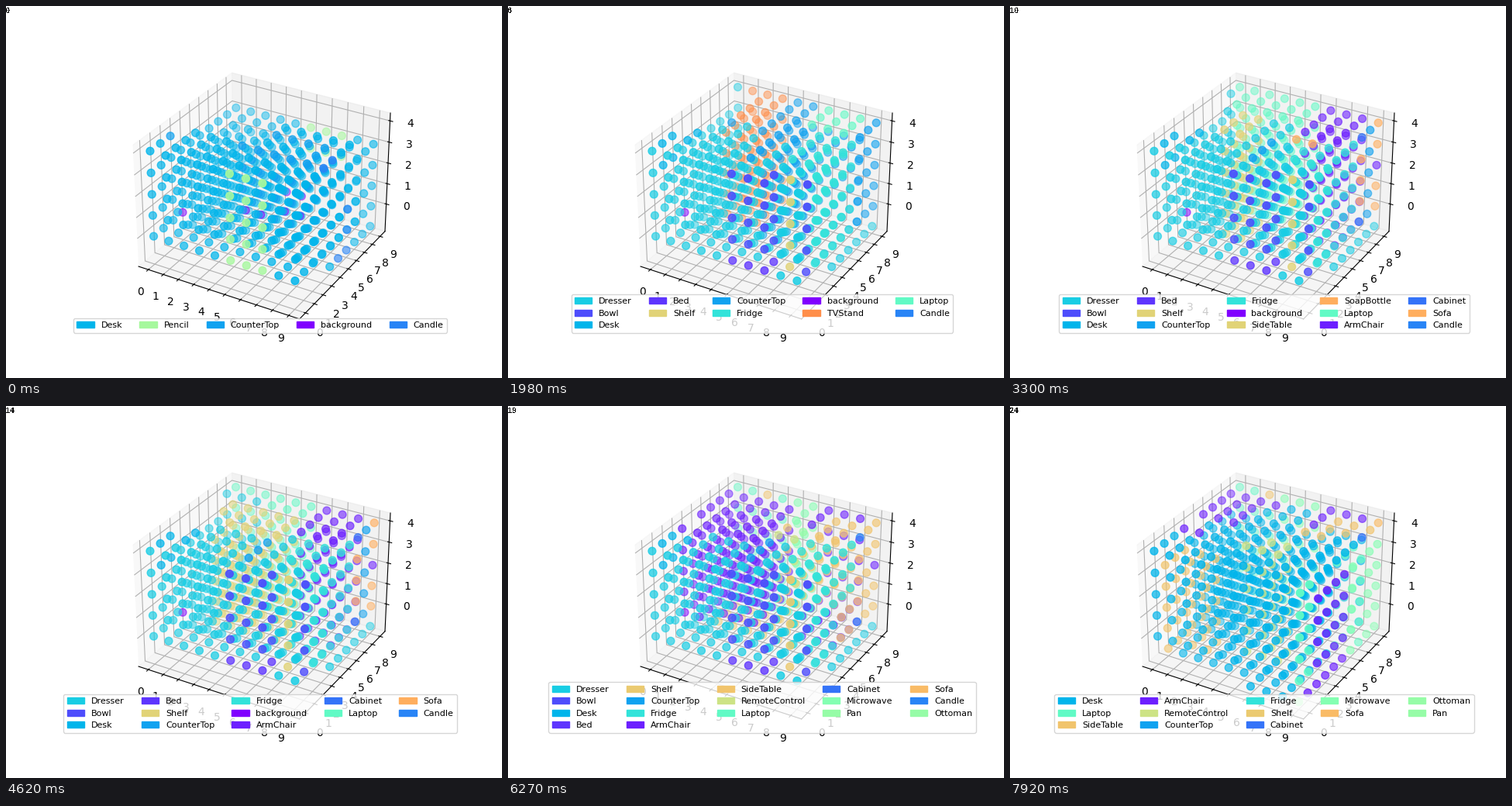
Animation, 640 px wide and 480 px high, one loop 8 s. Source, as a matplotlib script:

```python
import numpy as np
import matplotlib.pyplot as plt
from matplotlib.animation import FuncAnimation
from matplotlib.patches import Patch

STEP = 330       # ms between map updates
INTERVAL = 80
FRAMES = 100
ALL = (0, 9)

# Position of each class on the rainbow colour map
HUE = dict(background=0, ArmChair=.04, Bed=.07, Bowl=.1, Cabinet=.15,
           Candle=.175, CounterTop=.22, Desk=.25, Dresser=.3, Fridge=.35,
           HandTowel=.375, Laptop=.44, Microwave=.51, Pan=.545, Ottoman=.545,
           Pencil=.575, RemoteControl=.65, Shelf=.69, SideTable=.69,
           SoapBottle=.76, Sofa=.76, TVStand=.81)
LATE_HUE = dict(Shelf=.71, SideTable=.72, Sofa=.735)

# Legend entries, valid from the given step on
LEGENDS = {
    0: "Desk Pencil CounterTop background Candle",
    1: "Dresser Bowl Desk Bed Shelf CounterTop Fridge background Cabinet "
       "HandTowel Candle",
    5: "Dresser Bowl Desk Bed Shelf CounterTop Fridge background TVStand "
       "Laptop Candle",
    9: "Dresser Bowl Desk Bed Shelf CounterTop Fridge background SideTable "
       "SoapBottle Laptop ArmChair Cabinet Sofa Candle",
    11: "Dresser Bowl Desk Bed Shelf CounterTop Fridge background ArmChair "
        "Cabinet Laptop Sofa Candle",
    15: "Dresser Bowl Desk Bed Shelf CounterTop Fridge background ArmChair "
        "Cabinet Laptop Microwave Sofa Candle Pan",
    18: "Dresser Bowl Desk Bed Shelf CounterTop Fridge ArmChair SideTable "
        "RemoteControl Laptop Cabinet Microwave Pan Sofa Candle Ottoman",
    21: "Desk Bowl SideTable Shelf CounterTop Fridge ArmChair Bed "
        "RemoteControl Laptop Dresser Cabinet Microwave Pan Sofa Candle "
        "Ottoman",
    23: "Desk Laptop SideTable ArmChair RemoteControl CounterTop Fridge "
        "Shelf Cabinet Microwave Sofa Ottoman Pan",
}


def color(name, k):
    hue = LATE_HUE.get(name, HUE[name]) if k >= 15 else HUE[name]
    return plt.cm.rainbow(hue)


def span(v, shift=0):
    lo, hi = v if isinstance(v, tuple) else (v, v)
    return slice(lo + shift, hi + shift + 1)


class Room:
    """10 x 10 x 6 voxel map holding class names; z runs from -1 to 4."""

    def __init__(self):
        self.cells = np.full((10, 10, 6), "", dtype=object)

    def put(self, name, x, y, z=(-1, 4)):
        self.cells[span(x), span(y), span(z, 1)] = name


def first_view(put):
    put("Desk", ALL, ALL)
    put("CounterTop", (4, 8), (3, 5), (1, 4))
    put("Desk", (5, 7), 4, (2, 4))
    put("CounterTop", 0, 2, 4)
    put("Pencil", (5, 7), 0, (0, 4))
    put("Pencil", (5, 7), 9, (2, 3))
    put("background", (3, 4), 5, 0)
    put("background", (5, 6), 6, 0)
    put("background", (4, 5), 8, 0)
    put("Candle", 9, 6, (-1, 1))
    put("Candle", 9, 5, -1)
    put("Candle", 9, (3, 4), 4)
    put("", (0, 4), (4, 9), 4)
    put("", 0, 3, 4)
    put("", ALL, (7, 9), 4)


def front(put):
    put("Dresser", ALL, ALL)
    put("Fridge", (7, 9), (3, 8), (0, 4))
    put("Fridge", 9, 2, (0, 4))
    put("Desk", 0, (1, 2), (3, 4))
    put("Desk", 1, (2, 3), 4)
    put("Bowl", (5, 7), 0, (0, 4))
    put("Bowl", 7, 1, (0, 4))
    put("Bed", (5, 7), 0, 0)
    put("Bed", 7, 1, 0)
    put("Shelf", 8, 1, (0, 4))
    put("Bowl", 9, 1, (0, 4))
    put("CounterTop", 5, (2, 4), 4)


def towel_side(put):
    put("CounterTop", 5, (5, 8), 4)
    put("HandTowel", (8, 9), (7, 9), (0, 4))
    put("Shelf", 7, (2, 3), 4)
    put("Shelf", 8, 3, 4)
    put("Cabinet", 7, (4, 5), 4)
    put("background", (5, 7), 9, (2, 3))
    put("background", 7, (5, 6), (0, 2))
    put("", 0, (3, 9), 4)
    put("", (1, 4), (5, 9), 4)
    put("", (1, 8), 9, 4)


def stand_side(put):
    put("CounterTop", (4, 6), (5, 9))
    put("CounterTop", (7, 8), (8, 9))
    put("CounterTop", 9, (7, 9), (0, 4))
    put("CounterTop", 2, 5, 4)
    put("TVStand", (1, 3), (6, 9))
    put("Laptop", (6, 8), (7, 9), 4)
    put("", 0, (3, 8), 4)
    put("", 1, (4, 8), 4)


def chair_side(put, k):
    put("Laptop", (0, 5), 9)
    put("Laptop", (1 if k < 11 else 3, 5), (7, 8))
    put("ArmChair", (6, 8), (6, 9))
    put("Sofa", 9, 9, (0, 4))
    put("ArmChair", 9, 9, 2)
    put("CounterTop", 9, 8, (0, 4))
    put("Sofa", 9, 7, (1, 3))
    put("Cabinet", 9, 7, 4)
    put("Candle", 9, 7, 0)
    if k < 11:
        put("SideTable", (2, 3), (4, 6))
        put("SoapBottle", (6, 7), 5, 4)
    else:
        put("Shelf", (1, 5), (5, 7))
        put("Shelf", (2, 4), 4, (0, 3))
    put("", 0, (3, 7), 4)
    put("", 1, (4, 5), 4)


def chairs_spread(put, k):
    put("ArmChair", (0, 1 if k < 18 else 4), (4, 8), (0, 4))
    put("ArmChair", (0, 1), 3, (0, 4))
    put("Microwave", (4, 5), 9)
    put("", 0, 4, 4)
    if k < 18:
        return
    put("SideTable", 2, 9, 4)
    put("SideTable", (6, 8), (6, 8), (1, 4))
    put("ArmChair", 6, (7, 8), 4)
    put("SideTable", 9, (5, 9), (0, 4))
    put("Fridge", 9, (5, 6), (2, 4))
    put("ArmChair", 9, 9, 2)
    put("Sofa", 9, 7, (1, 3))
    put("Candle", 9, 7, 4)
    put("Candle", 9, 7, 0)
    put("RemoteControl", (5, 6), 5, (2, 4))
    put("Pan", 6, 6, 4)
    put("Microwave", 5, (7, 8), (2, 4))


def last_view(put):
    put("Desk", ALL, ALL)
    put("SideTable", (0, 2), (1, 3), (-1, 3))
    put("Desk", (1, 2), 1, (-1, 3))
    put("RemoteControl", (4, 6), 3)
    put("RemoteControl", (5, 6), 4)
    put("ArmChair", (0, 1), 3, 4)
    put("ArmChair", (0, 2), (5, 8), 4)
    put("ArmChair", 3, 8, 4)
    put("Laptop", (0, 2), 9)
    put("Microwave", (3, 5), 9)
    put("SideTable", 2, 9, 4)
    put("Laptop", 8, (6, 8), (-1, 3))
    put("Microwave", 9, (6, 9), (-1, 3))
    put("Laptop", 9, 7, (-1, 3))
    put("Laptop", 9, (0, 1), (0, 4))
    put("ArmChair", 9, (2, 5), (-1, 3))
    put("ArmChair", 9, 1, -1)
    put("Pan", 9, 0, -1)
    put("SideTable", (7, 9), (7, 8), 4)
    put("SideTable", (6, 7), 6, 4)
    put("Sofa", 9, 9, 4)
    put("ArmChair", 6, (7, 9), 4)
    put("ArmChair", (7, 8), 9, 4)
    put("Cabinet", 9, 7, 4)
    put("", 0, 4, 4)
    put("", (0, 5), 0, -1)


def build(k):
    room = Room()
    put = room.put
    if k >= 22:
        last_view(put)
        return room.cells
    if k == 0:
        first_view(put)
    else:
        front(put)
        if k < 4:
            towel_side(put)
        elif k < 9:
            stand_side(put)
        else:
            chair_side(put, k)
            if k >= 15:
                chairs_spread(put, k)
    put("background", 0, 3, 0)
    put("", ALL, (0, 3), -1)
    return room.cells


def limits(lo, hi):
    pad = .05 * (hi - lo)
    pad += (hi - lo + 2 * pad) / 48
    return lo - pad, hi + pad


fig = plt.figure(figsize=(6.4, 4.8), dpi=100)
ax = fig.add_subplot(projection="3d")
ax.set_xticks(range(10))
ax.set_yticks(range(10))
ax.set_zticks(range(5))
ax.set_xlim(*limits(0, 9))
ax.set_ylim(*limits(0, 9))
ax.set_zlim(*limits(-1, 4))
counter = fig.text(-.5 / 640, 1 - 9 / 480, "", family="Liberation Mono",
                   weight="bold", size=7.2, antialiased=False)
dots = []


def update(i):
    k = (i * INTERVAL + 70) // STEP
    while dots:
        dots.pop().remove()
    cells = build(k)
    x, y, z = np.nonzero(cells != "")
    colors = [color(name, k) for name in cells[x, y, z]]
    dots.append(ax.scatter(x, y, z - 1, s=50, c=colors))
    labels = LEGENDS[max(s for s in LEGENDS if s <= k)].split()
    ax.legend(handles=[Patch(color=color(n, k), label=n) for n in labels],
              loc="lower center", ncol=5, fontsize=8)
    counter.set_text(str(k))
    return dots


anim = FuncAnimation(fig, update, frames=FRAMES, interval=INTERVAL,
                     init_func=lambda: update(0), repeat=True, repeat_delay=0)
plt.show()
```
